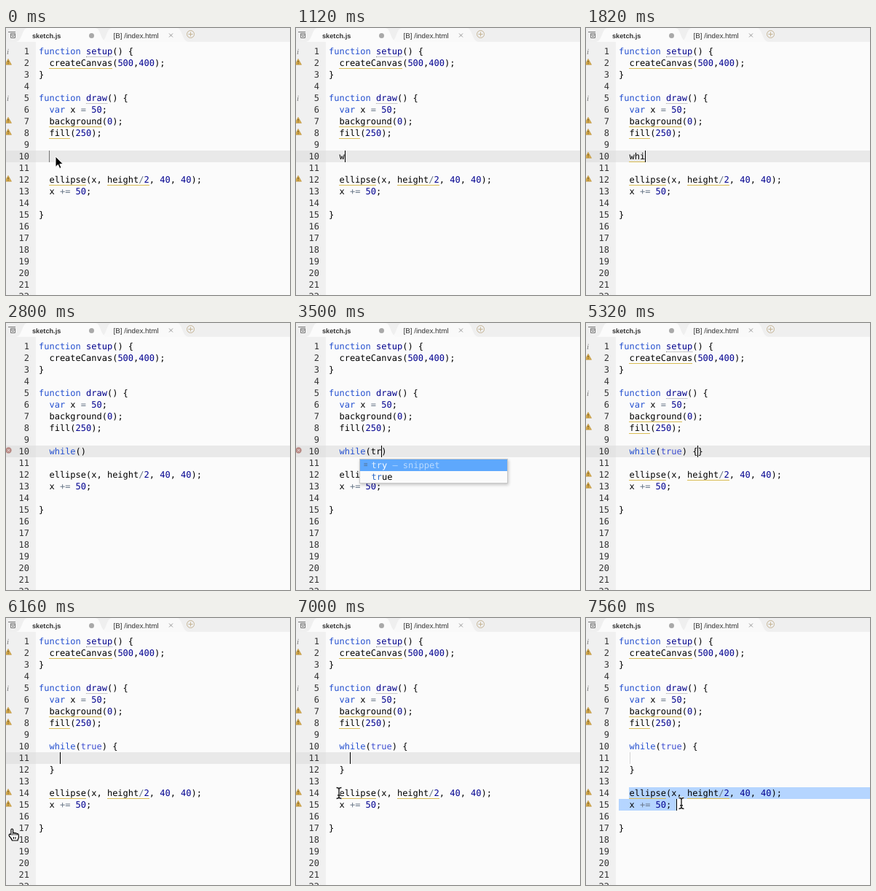
Recreate the animation shown at these times as an HTML page. Size 390 px wide and 366 px high, loop 8 s.

```html
<!DOCTYPE html>
<html lang="en">
<head>
<meta charset="utf-8">
<title>Code editor</title>
<style>
  html, body { margin: 0; width: 100%; height: 100%; overflow: hidden; }
  body { position: relative; background: #fbfbfb; }
  body div, body svg { position: absolute; }
  #stage { left: 0; top: 0; width: 390px; height: 366px; overflow: hidden; }
  .mono {
    font: 12px/16px "DejaVu Sans Mono", monospace;
    text-rendering: geometricPrecision; white-space: pre; color: #000;
  }
  #gutter { left: 0; top: 19px; width: 41px; height: 347px; background: #f0f0f0; }
  .num { left: 0; width: 32px; text-align: right; color: #333; }
  .band { left: 41px; width: 349px; height: 16px; background: #e9e9e9; }
  .tick { left: 0; width: 41px; height: 16px; background: #e4e4e4; }
  .sel { height: 16px; background: #b5d5ff; }
  .warn { height: 1px; background: #d9bd55; }
  .info { height: 0; border-bottom: 1px dotted #999; }
  .guide { width: 1px; height: 16px; background: #d4d4d4; }
  .kw { color: #2450d0; }
  .fn { color: #00008c; }
  .lit { color: #3c4cd0; }
  .n { color: #000090; }
  .op { color: #687687; }
  #caret { width: 1px; height: 16px; }
  #popup {
    left: 87px; top: 186px; width: 202px; border: 1px solid #c8c8c8;
    background: #fbfbfb; box-shadow: 1px 2px 4px rgba(0, 0, 0, .22);
  }
  #popup div { position: relative; height: 16px; padding-left: 15.5px; }
  #popup b { font-weight: normal; color: #2d69c7; }
  #popup .on { background: #5ea8fd; color: #fff; }
  #popup .on b { color: #e4f1ff; }
  #popup .on span { color: #b9dafe; }
  #popup i { position: absolute; left: 5px; top: 0; font: 9px/16px "DejaVu Sans Mono", monospace; color: #55779c; }
</style>
</head>
<body>
<div id="stage">
  <div id="gutter"></div>
  <div id="view" class="mono"></div>
  <div id="caret"></div>
  <div id="popup" class="mono"></div>
  <svg id="bar" width="390" height="20" font-family="Liberation Sans, Arial, sans-serif" text-rendering="geometricPrecision">
    <path fill="#efefef" d="M0 0H390V19H0Z"/>
    <path fill="#f9f9f9" d="M130 19Q135 18 138 9T145 0H235Q239 0 242 9T250 19Z"/>
    <path fill="#fbfbfb" d="M14 19Q19 18 22 9T29 0H123Q127 0 130 9T138 19Z"/>
    <g fill="none" stroke="#777">
      <path d="M3 5.5H13M6.5 7.5H12.5V13.5H6.5ZM6 9.5H13M8 11.5H11"/>
      <path stroke="#999" d="M224 7.500l5 5m0-5l-5 5"/>
      <g stroke="#c5b596"><circle cx="253.500" cy="8.500" r="5"/><path d="M250.500 8.500h6m-3-3v6"/></g>
    </g>
    <circle cx="117.500" cy="10.500" r="3.500" fill="#a9a9a9"/>
    <text x="36" y="14" font-size="9.200" font-weight="bold" fill="#333">sketch.js</text>
    <text x="147.500" y="14" font-size="9.800" fill="#333">[B] /index.html</text>
  </svg>
  <svg id="mouse" width="24" height="24" viewBox="-12 -12 24 24" overflow="visible"></svg>
</div>
<script>
const CW = 7.224, LEFT = 45, LOOP = 8000;
const $ = id => document.getElementById(id);
const rowY = row => 24 + 16 * (row - 1);
const colX = col => LEFT + CW * col;

const HEAD = [
  "function setup() {", "  createCanvas(500,400);", "}", "",
  "function draw() {", "  var x = 50;", "  background(0);", "  fill(250);", ""
];
const TAIL = ["", "  ellipse(x, height/2, 40, 40);", "  x += 50;", "", "}"];

// Types into row 10; the caret sits at the given column.
const type = (text, col = text.length + 2) => ({ code: ["  " + text], caret: [10, col], alpha: 1, mouse: null });
const beam = (x, y) => ({ mouse: ["beam", x, y] });

// [time, what changes]
const STEPS = [
  [0, { ...type(""), alpha: .5, mouse: ["arrow", 68, 177], lint: "warn", typo: false,
        loop: false, popup: null, sel: null, active: 10 }],
  [140, { alpha: .15 }], [280, { alpha: 0 }],
  [560, { alpha: .3 }], [700, { alpha: .8 }], [840, { alpha: 1 }],
  [1120, type("w")], [1260, type("wh")], [1400, type("whi")],
  [1820, { typo: true }],
  [1960, type("whil")], [2100, type("while")], [2240, type("while()", 8)],
  [2660, { lint: "error", typo: false, alpha: .5 }], [2800, { alpha: 0 }],
  [3080, { alpha: .6 }], [3220, type("while(t)", 9)],
  [3500, { ...type("while(tr)", 10), popup: ["try", "true"] }],
  [3640, { ...type("while(tru)", 11), popup: ["true"] }],
  [3780, type("while(true)", 12)], [3920, { popup: null }],
  [4060, type("while(true)")], [4200, type("while(true) ")],
  [4760, { lint: "warn", loop: true }],
  [5040, type("while(true) {}", 15)],
  [5740, { code: ["  while(true) {", "    ", "  }"], caret: [11, 4], active: 11 }],
  [6160, { mouse: ["hand", 11, 297] }],
  [6300, beam(150, 300)], [6440, beam(300, 290)], [6580, beam(344, 270)],
  [6720, beam(200, 250)], [6860, beam(90, 242)], [7000, beam(58.5, 240)],
  [7280, { caret: [14, 2], active: 14 }],
  [7420, { ...beam(84, 247), caret: [15, 5], active: 0, sel: 5 }],
  [7560, { ...beam(131, 254), caret: [15, 11], sel: 11 }]
];

const BEAM = "M-3.5 -7.5Q0 -7.5 0 -5V5Q0 7.5 -3.5 7.5M3.5 -7.5Q0 -7.5 0 -5V5Q0 7.5 3.5 7.5M-2 3H2";
const MICE = {
  arrow: `<path d="M0 -1V13.5L3.4 10.4L5.7 15.5L8 14.5L5.8 9.6H10.3Z" stroke="#fff"/>`,
  beam: `<g fill="none"><path d="${BEAM}" stroke="#fff" stroke-width="3"/><path d="${BEAM}" stroke="#222" stroke-width="1.4"/></g>`,
  hand: `<path d="M-4 0V-7Q-2.7 -9 -1.4 -7V-2Q0 -3.5 1.3 -1.8Q2.7 -3 3.9 -1.2Q6 -1.8 6.3 .5V4Q5.5 6 5 8H-2.5Q-3.5 5 -6.5 2Q-7.5 -.5 -5.5 -.8Z" fill="#fff" stroke="#000" stroke-width="1.2"/>
    <path d="M-1.4 -2V1M1.3 -1.8V1M3.9 -1.2V1M-.5 3V6M2 3V6" stroke="#000"/>`
};

const ICONS = {
  info: `<text x="1" y="12" font-family="Liberation Serif, serif" font-style="italic" font-size="11" fill="#777">i</text>`,
  warn: `<path d="M3 2.3L7.5 10.3H-1.5Z" fill="#d6ab4e" stroke="#bd9038" stroke-width=".6"/><path d="M3 4.8V7.3M3 8.3v1" stroke="#5b4414"/>`,
  error: `<circle cx="3.5" cy="6.5" r="4.2" fill="#b98b86"/><path d="M2 5l3 3m0-3l-3 3" stroke="#f3e6e4"/>`
};

const TOKEN = /\b(function|var|while)\b|\b(setup|draw)\b|\b(true)\b|\b(\d+)\b|(\+=|=|\/)/g;
const KINDS = ["kw", "fn", "lit", "n", "op"];
const paint = text => text.replace(TOKEN, (m, ...g) =>
  `<span class="${KINDS[g.findIndex(x => x !== undefined)]}">${m}</span>`);

const box = (cls, x, y, w, body = "") =>
  `<div class="${cls}" style="left:${x}px;top:${y}px;${w ? `width:${w}px` : ""}">${body}</div>`;
const icon = (kind, row) =>
  `<svg width="12" height="16" style="left:0;top:${rowY(row)}px">${ICONS[kind]}</svg>`;

function lint(s, text, row) {
  if (s.lint === "error") return row === 10 ? icon("error", row) : "";
  const hits = (kind, re) => [...text.matchAll(re)]
    .map(m => box(kind, colX(m.index), rowY(row) + 15, CW * m[0].length)).join("");
  const info = hits("info", /setup|draw/g);
  const warn = hits("warn", /createCanvas|background|fill|ellipse|height\/2/g) +
    (s.typo ? hits("warn", /whi/g) : "");
  const unreached = s.loop && text.includes("+=");
  return info + warn + (info ? icon("info", row) : "") + (warn || unreached ? icon("warn", row) : "");
}

function render(s) {
  const lines = [...HEAD, ...s.code, ...TAIL];
  let html = "";
  if (s.active) html += box("tick", 0, rowY(s.active)) + box("band", 41, rowY(s.active));
  if (s.sel) html += box("sel", colX(2), rowY(14), 390 - colX(2)) + box("sel", LEFT, rowY(15), CW * s.sel);
  if (s.code.length > 1 && s.active !== 11) html += box("guide", 60, rowY(11));
  for (let row = 1; row <= 22; row++) {
    const text = lines[row - 1] || "";
    html += box("num", 0, rowY(row), 0, row) + lint(s, text, row) + box("", LEFT, rowY(row), 0, paint(text));
  }
  $("view").innerHTML = html;

  const [row, col] = s.caret;
  Object.assign($("caret").style, {
    left: Math.round(colX(col)) + "px", top: rowY(row) + "px", background: `rgba(0, 0, 0, ${s.alpha})`
  });

  const words = s.popup || [];
  const typed = words.length > 1 ? 2 : 3;
  $("popup").style.display = s.popup ? "" : "none";
  $("popup").innerHTML = words.map((word, i) => {
    const snippet = word === "try";
    return `<div class="${i ? "" : "on"}">${snippet ? "<i>≡</i>" : ""}<b>${word.slice(0, typed)}</b>` +
      `${word.slice(typed)}${snippet ? "<span> – snippet</span>" : ""}</div>`;
  }).join("");

  const mouse = $("mouse");
  mouse.style.display = s.mouse ? "" : "none";
  if (s.mouse) {
    const [kind, x, y] = s.mouse;
    mouse.innerHTML = MICE[kind];
    Object.assign(mouse.style, { left: x - 12 + "px", top: y - 12 + "px" });
  }
}

let shown = -1;
function tick() {
  const t = performance.now() % LOOP;
  const past = STEPS.filter(([at]) => at <= t);
  if (past.length !== shown) {
    shown = past.length;
    render(Object.assign({}, ...past.map(([, change]) => change)));
  }
  requestAnimationFrame(tick);
}
tick();
</script>
</body>
</html>
```
